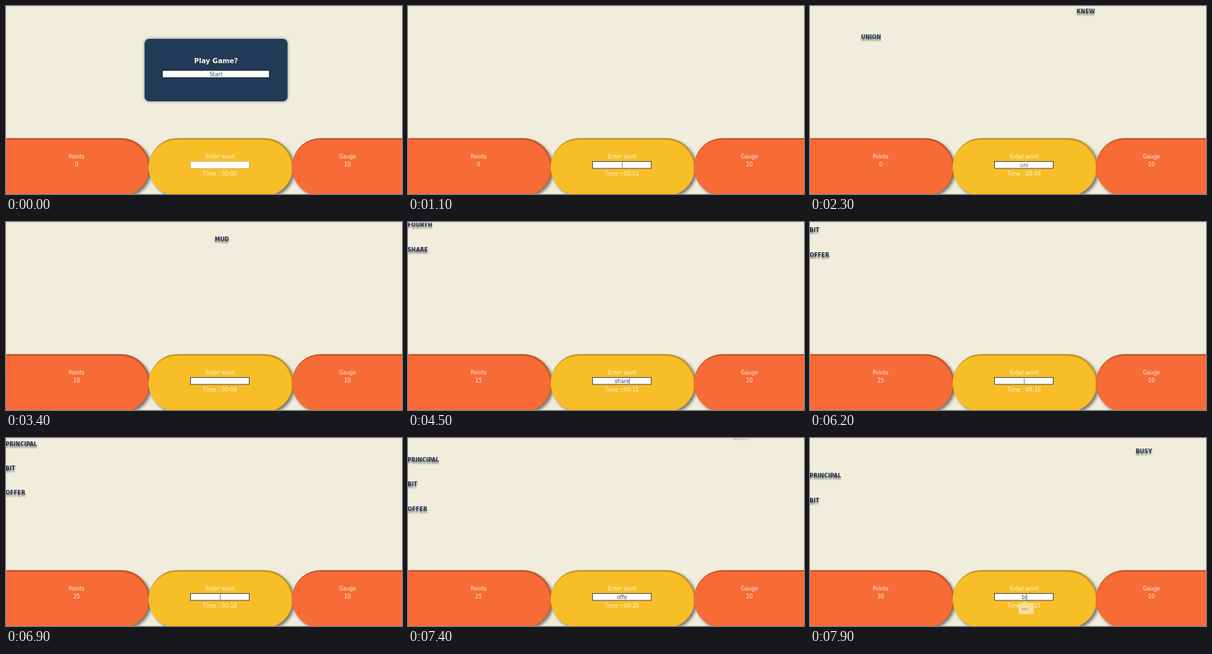
An HTML page that plays this animation: 600x286 px, repeating every 8000 ms.

```html
<!DOCTYPE html>
<html lang="en">
<head>
<meta charset="utf-8">
<title>Typing game</title>
<style>
  html, body { margin: 0; width: 100%; height: 100%; overflow: hidden; background: #f1eddd; }
  #stage { position: relative; width: 600px; height: 286px; overflow: hidden; }
  .panel {
    position: absolute; top: 201px; height: 88px; box-sizing: border-box;
    box-shadow: 3px 3px 4px rgba(0, 0, 0, .5), inset -1px 2px 2px rgba(0, 0, 0, .27);
  }
  .left { left: 0; width: 218px; background: #f76b36; border-radius: 2px 44px 44px 2px; }
  .middle { left: 216px; width: 219px; background: #f7be27; border-radius: 44px; }
  .right { left: 433px; width: 190px; background: #f76b36; border-radius: 44px 2px 2px 44px; }
  svg { position: absolute; left: 0; top: 0; }
  text { font: 8px "DejaVu Sans", Verdana, sans-serif; fill: #fdf5e2; text-anchor: middle; white-space: pre; }
  #words text {
    font-size: 8.2px; font-weight: bold; fill: #20324c; text-anchor: start;
    filter: drop-shadow(.5px 3px 1.2px rgba(0, 0, 0, .5));
  }
  #dialog > rect:first-child { filter: drop-shadow(0 .5px 2px rgba(0, 0, 0, .5)); }
</style>
</head>
<body>
<div id="stage">
  <div class="panel left"></div>
  <div class="panel middle"></div>
  <div class="panel right"></div>
  <svg width="600" height="286" viewBox="0 0 600 286">
    <g id="words"></g>
    <rect width="600" height="1" fill="#dcdad5"/>
    <text x="107" y="232">Points</text>
    <text id="points" x="107" y="243.6"></text>
    <text x="324.3" y="232">Enter word</text>
    <text id="timer" x="324.3" y="257.8" style="font-size:8.2px"></text>
    <text x="517.3" y="232">Gauge</text>
    <text x="517.3" y="243.6">10</text>
    <rect id="field" x="279.5" y="236.5" width="89" height="10.5" fill="#fff"/>
    <text id="typed" x="324.3" y="244.8" style="fill:#4a4a4a"></text>
    <rect id="caret" y="237.5" width=".7" height="8.5" fill="#444"/>
    <g id="hint">
      <path d="M316 251h6.5l2.5-3 2.5 3h11.5v17h-23z" fill="#f9e0a0" fill-opacity=".92"/>
      <text x="325.2" y="262" style="font-size:4.5px;fill:#8b8068">BAD</text>
    </g>
    <path id="pointer" d="M431.5 219v5l1.2-1 1 1.8.8-.4-.9-1.8h1.6z" fill="#fff" stroke="#999" stroke-width=".3" opacity=".75"/>
    <g id="dialog">
      <rect x="210" y="50" width="216.5" height="95" rx="7" fill="#213a57"/>
      <text x="318.3" y="86.7" style="font-size:10.2px;font-weight:bold">Play Game?</text>
      <rect x="237" y="98" width="162" height="11" fill="#fff" stroke="#101820"/>
      <text x="318.3" y="107" style="fill:#33475f">Start</text>
    </g>
  </svg>
</div>
<script>
const LOOP = 8000, STEP = 100;
const START = 0.68;          // seconds at which the game begins
const CLOCK_RATE = 3;        // game seconds per second
const FALL = 48.5, GAP = 37.3, OFFSET = -64.7;
const POINTS_PER_WORD = 5;

// "<" is backspace; a word is submitted one key interval after its last key.
const words = [
  { text: "UNION", x: 77.3, start: 1.95, pace: .13 },
  { text: "KNEW", x: 404, start: 2.75, pace: .1, shift: -1.9 },
  { text: "MUD", x: 316.3, start: 3.5, pace: .1 },
  { text: "SHARE", x: -.8, start: 4.1, pace: .1 },
  { text: "FOURTH", x: -.8, start: 5.1, pace: .11, keys: "foou<<urth" },
  { text: "OFFER", x: -.8, start: 7.05, pace: .1 },
  { text: "BIT", x: -.8, start: 7.75, pace: .12 },
  { text: "PRINCIPAL", x: -.8 },
  { text: "BUSY", x: 493.6 }
];

const $ = id => document.getElementById(id);
const show = (el, on) => el.setAttribute("visibility", on ? "visible" : "hidden");

words.forEach((word, i) => {
  word.keys = word.keys || word.text.toLowerCase();
  word.done = word.start ? word.start + word.pace * word.keys.length : Infinity;
  word.y = OFFSET - GAP * i - (word.shift || 0) * -1;
  word.el = document.createElementNS("http://www.w3.org/2000/svg", "text");
  word.el.textContent = word.text;
  word.el.setAttribute("x", word.x);
  $("words").append(word.el);
});

function typedAt(t) {
  const word = words.find(w => t >= w.start && t < w.done);
  if (!word) return "";
  const count = Math.floor((t - word.start) / word.pace + 1e-6) + 1;
  return [...word.keys.slice(0, count)]
    .reduce((s, key) => key === "<" ? s.slice(0, -1) : s + key, "");
}

function draw(t) {
  const playing = t >= START;
  const seconds = playing ? Math.floor((t - START) * CLOCK_RATE) : 0;
  show($("dialog"), !playing);
  show($("pointer"), playing);
  show($("hint"), t >= 7.8);
  $("field").setAttribute("stroke", playing ? "#3c4350" : "#c4b894");

  for (const word of words) {
    const y = word.y + FALL * t;
    show(word.el, y > -8 && t < word.done);
    word.el.setAttribute("y", y + 3);
  }

  $("points").textContent = POINTS_PER_WORD * words.filter(w => t >= w.done).length;
  $("timer").textContent = "Time : 00:" + String(seconds).padStart(2, "0");

  const typed = $("typed");
  typed.textContent = typedAt(t);
  const width = typed.textContent ? typed.getComputedTextLength() : 0;
  $("caret").setAttribute("x", 324.3 + width / 2);
  show($("caret"), playing && t % .34 < .17);
}

const origin = performance.now();
function tick() {
  const ms = (performance.now() - origin) % LOOP;
  draw(Math.floor(ms / STEP) * STEP / 1000);
  requestAnimationFrame(tick);
}
tick();
</script>
</body>
</html>
```
